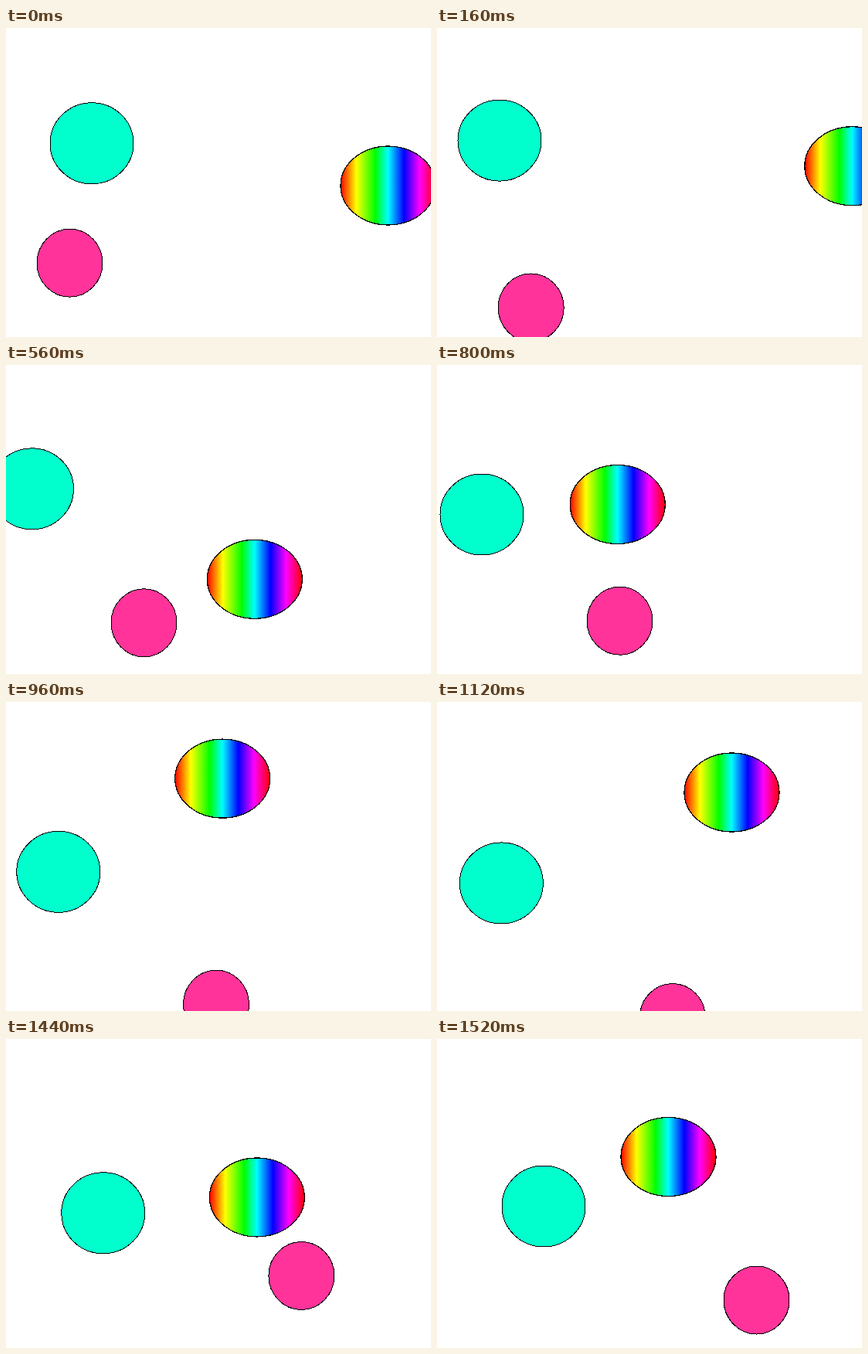
Animation, 550 px wide and 400 px high, one loop 1.6 s. Source, as an HTML page:

```html
<!DOCTYPE html>
<html lang="en">
<head>
<meta charset="utf-8">
<title>Three bouncing balls</title>
<style>
  html, body { margin: 0; width: 100%; height: 100%; overflow: hidden; background: #fff; }
  svg { display: block; width: 550px; height: 400px; }
  ellipse { stroke: #000; stroke-width: 1; shape-rendering: crispEdges; }
  #multi { stroke-width: 1.25; }
</style>
</head>
<body>
<svg viewBox="0 0 550 400">
  <defs>
    <linearGradient id="rainbow">
      <stop offset="0" stop-color="#f00"/>
      <stop offset=".165" stop-color="#ff0"/>
      <stop offset=".365" stop-color="#0f0"/>
      <stop offset=".498" stop-color="#0ff"/>
      <stop offset=".667" stop-color="#00f"/>
      <stop offset=".831" stop-color="#f0f"/>
      <stop offset="1" stop-color="#f00"/>
    </linearGradient>
  </defs>
  <ellipse id="teal" rx="54" ry="52.5" fill="#00ffcc"/>
  <ellipse id="pink" rx="42.5" ry="44" fill="#ff3399"/>
  <ellipse id="multi" rx="61.5" ry="51" fill="url(#rainbow)"/>
</svg>
<script>
const STEP = 80, STEPS = 20;

// Turning points of each ball as [step, x, y]; a smooth curve joins them.
const turns = {
  teal: [
    [0, 111, 149.3], [4, 54.5, 145], [7, 33.5, 160.3], [10, 58, 193.5],
    [12, 67.8, 219.8], [16, 102.3, 238.8], [19, 138, 216.5]
  ],
  pink: [
    [0, 82.5, 304.2], [4, 161, 419.5], [4.3, 167, 428], [7, 178.5, 333.8],
    [8.5, 204, 293], [10, 236.5, 331.2], [12, 272, 391.2], [13.1, 292, 424],
    [16, 333.5, 334.6], [17.5, 368, 299], [19, 413.5, 338]
  ],
  multi: [
    [0, 494.5, 204], [1.5, 545, 176], [4, 448, 218.8], [7, 321.8, 277.3],
    [10, 233.7, 180.5], [12, 280.2, 99.1], [14, 381.5, 117],
    [16, 402.7, 208.5], [17.5, 340, 222], [19, 299.5, 152.5]
  ]
};

const slope = (a, b, axis) => (b[axis] - a[axis]) / (b[0] - a[0]);

// Mean of the slopes on both sides; at an end, the one that exists.
function tangent(keys, i, axis) {
  const last = keys.length - 1;
  const before = Math.max(i, 1), after = Math.min(i, last - 1);
  return (slope(keys[before - 1], keys[before], axis) +
          slope(keys[after], keys[after + 1], axis)) / 2;
}

function curve(keys, step, axis) {
  const i = Math.max(1, keys.findIndex(k => k[0] >= step));
  const a = keys[i - 1], b = keys[i];
  const span = b[0] - a[0], u = (step - a[0]) / span, v = 1 - u;
  return a[axis] * v * v * (1 + 2 * u) + b[axis] * u * u * (1 + 2 * v) +
    span * u * v * (v * tangent(keys, i - 1, axis) - u * tangent(keys, i, axis));
}

function draw(ms) {
  const step = Math.floor(ms / STEP) % STEPS;
  for (const id in turns) {
    const ball = document.getElementById(id);
    ball.setAttribute("cx", curve(turns[id], step, 1));
    ball.setAttribute("cy", curve(turns[id], step, 2));
  }
}

const start = performance.now();
function tick(now) {
  draw(Math.max(0, now - start));
  requestAnimationFrame(tick);
}
draw(0);
requestAnimationFrame(tick);
</script>
</body>
</html>
```
